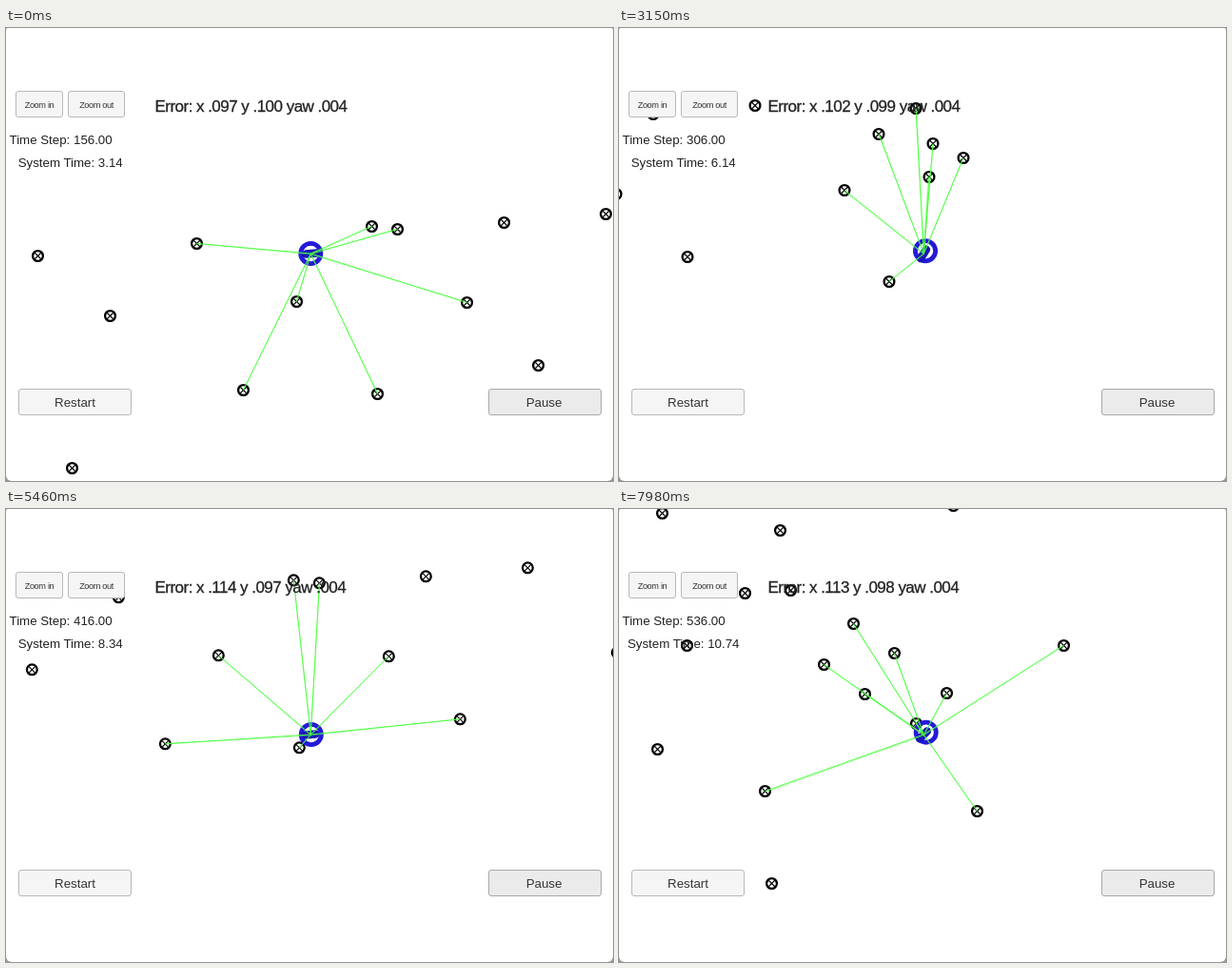
Animation of 638x476 px, one loop 8 s. Source, as an HTML page with a canvas:

```html
<!DOCTYPE html>
<html lang="en">
<head>
<meta charset="utf-8">
<title>Localization simulator</title>
<style>
  html, body { margin: 0; width: 100%; height: 100%; overflow: hidden; background: #999; }
  #stage { position: relative; width: 638px; height: 476px; overflow: hidden;
           background: #fff; border-radius: 2px 2px 6px 6px; }
  canvas, svg { position: absolute; left: 0; top: 0; }
  text { font: 13.3px "Liberation Sans", Arial, sans-serif; fill: #222; white-space: pre; }
  .mid { text-anchor: middle; }
  .label { fill: #333; }
  .zoom { font-size: 9.2px; letter-spacing: -.45px; word-spacing: .4px; }
  #error { font-size: 17px; letter-spacing: -.53px; stroke: #222; stroke-width: .3px; }
  rect { fill: #f5f5f5; stroke: #b8b8b8; }
  #pause { fill: #ebebeb; stroke: #a8a8a8; }
</style>
</head>
<body>
<div id="stage">
  <canvas width="638" height="476"></canvas>
  <svg width="638" height="476">
    <rect x="10.5" y="66.5" width="49" height="27" rx="2.5"/>
    <rect x="65.5" y="66.5" width="59" height="27" rx="2.5"/>
    <rect x="13.5" y="379.5" width="118" height="27" rx="2.5"/>
    <rect id="pause" x="507.5" y="379.5" width="118" height="27" rx="2.5"/>
    <text class="mid label zoom" x="35" y="84">Zoom in</text>
    <text class="mid label zoom" x="95" y="84">Zoom out</text>
    <text class="mid label" x="72.5" y="398">Restart</text>
    <text class="mid label" x="565.5" y="398">Pause</text>
    <text id="step" x="3.5" y="122"></text>
    <text id="clock" class="mid" x="67.7" y="145.5"></text>
    <text id="error" x="156.5" y="88"></text>
  </svg>
</div>
<script>
const LOOP = 8000, TICK = 70, RANGE = 200;
const CAR = { x: 320.3, y: 237 };

// The map: landmark positions when the car is at 0,0.
const landmarks = [
  [33, 239], [109, 302], [200, 226], [384, 208], [411, 211], [523, 204], [630, 195],
  [305, 287], [484, 288], [249, 380], [390, 384], [559, 354], [69, 462],
  [724, 284], [760, 225], [799, 198], [817, 235], [813, 270], [849, 250], [771, 380],
  [-154, 264], [-47, 315], [-218, 404], [-152, 439], [-183, 482], [-109, 470],
  [-140, 513], [-54, 512], [-86, 544], [-22, 636], [-229, 341], [-353, 323],
  [-266, 407], [-327, 462], [-358, 571], [-245, 615], [-238, 712]
];

// Key poses of the drive: time, x, y.
const route = [
  [0, 0, 0], [840, 222, -18], [1890, 431, -26], [2520, 494, 27], [3150, 487.5, 114],
  [3800, 407, 164], [4900, 202, 129], [6090, -55, 154], [6930, -223, 200], [7980, -398, 319]
];

// Errors in thousandths, evenly spaced over the loop.
const errorX = [97, 101.5, 102, 113.5, 115.4, 113];
const errorY = [100, 101, 99, 97, 96.2, 98];

const $ = id => document.getElementById(id);
const ctx = document.querySelector('canvas').getContext('2d');

function sample(values, t) {
  const u = t / LOOP * (values.length - 1), i = Math.floor(u);
  return values[i] + (values[i + 1] - values[i]) * (u - i);
}

const rate = (i, k) => (route[i + 1][k] - route[i][k]) / (route[i + 1][0] - route[i][0]);

function slope(i, k) {
  const last = route.length - 1;
  if (i === 0) return 2 * rate(0, k) - slope(1, k);
  if (i === last) return 2 * rate(last - 1, k) - slope(last - 1, k);
  const before = route[i][0] - route[i - 1][0], after = route[i + 1][0] - route[i][0];
  return (rate(i - 1, k) * after + rate(i, k) * before) / (before + after);
}

// Cubic Hermite curve through the key poses.
function along(t, k) {
  let i = 0;
  while (i < route.length - 2 && t >= route[i + 1][0]) i++;
  const a = route[i], b = route[i + 1];
  const d = b[0] - a[0], u = (t - a[0]) / d, v = 1 - u;
  return v * v * ((1 + 2 * u) * a[k] + u * d * slope(i, k)) +
         u * u * ((1 + 2 * v) * b[k] - v * d * slope(i + 1, k));
}

function noise(n) {
  const s = Math.sin(n * 12.9898) * 43758.5453;
  return (s - Math.floor(s)) * 2 - 1;
}

function line(x1, y1, x2, y2) {
  ctx.beginPath();
  ctx.moveTo(x1, y1);
  ctx.lineTo(x2, y2);
  ctx.stroke();
}

function ring(x, y, r, width, color) {
  ctx.strokeStyle = color;
  ctx.lineWidth = width;
  ctx.beginPath();
  ctx.arc(x, y, r, 0, Math.PI * 2);
  ctx.stroke();
}

function drawLandmark([x, y]) {
  ring(x, y, 5.4, 2.3, '#000');
  ctx.lineWidth = 1.1;
  line(x - 3.5, y - 3.5, x + 3.5, y + 3.5);
  line(x - 3.5, y + 3.5, x + 3.5, y - 3.5);
}

function drawCar(heading, lag) {
  const cos = Math.cos(heading), sin = Math.sin(heading);
  const { x, y } = CAR;
  ring(x - cos * lag, y - sin * lag, 10.6, 4.8, '#241ad8');
  ctx.strokeStyle = '#1a15b8';
  ctx.lineWidth = 8.5;
  ctx.lineCap = 'round';
  line(x - cos * 5, y - sin * 5, x + cos * 6, y + sin * 6);
  ctx.lineCap = 'butt';
}

function drawBeam([x, y], seed) {
  if (Math.hypot(x - CAR.x, y - CAR.y) > RANGE) return;
  ctx.strokeStyle = '#4cff40';
  ctx.lineWidth = 1;
  line(CAR.x, CAR.y, x, y);
  ctx.globalAlpha = 0.4;
  line(CAR.x, CAR.y + 1, x + noise(seed), y + noise(seed + 0.5));
  ctx.globalAlpha = 1;
}

function render(frame) {
  const t = frame * TICK;
  const px = along(t, 1), py = along(t, 2);
  const heading = Math.atan2(along(t + 5, 2) - py, along(t + 5, 1) - px);
  const lag = 2 - 2 * Math.cos(t / 4900 * Math.PI * 2);
  const points = landmarks.map(([x, y]) => [x - px + 0.5, y - py + 0.5]);

  ctx.clearRect(0, 0, 638, 476);
  points.forEach(drawLandmark);
  drawCar(heading, lag);
  points.forEach((p, n) => drawBeam(p, frame * points.length + n));

  const ticks = Math.floor(frame * 10 / 3);
  const digits = v => '.' + String(Math.round(v)).padStart(3, '0');
  $('step').textContent = `Time Step: ${(156 + ticks).toFixed(2)}`;
  $('clock').textContent = `System Time: ${(3.14 + ticks * 0.02).toFixed(2)}`;
  $('error').textContent =
    `Error: x ${digits(sample(errorX, t))} y ${digits(sample(errorY, t))} yaw .004`;
}

const start = performance.now();
let shown = -1;
function play() {
  const frame = Math.floor((performance.now() - start) % LOOP / TICK);
  if (frame !== shown) render(shown = frame);
  requestAnimationFrame(play);
}
play();
</script>
</body>
</html>
```
